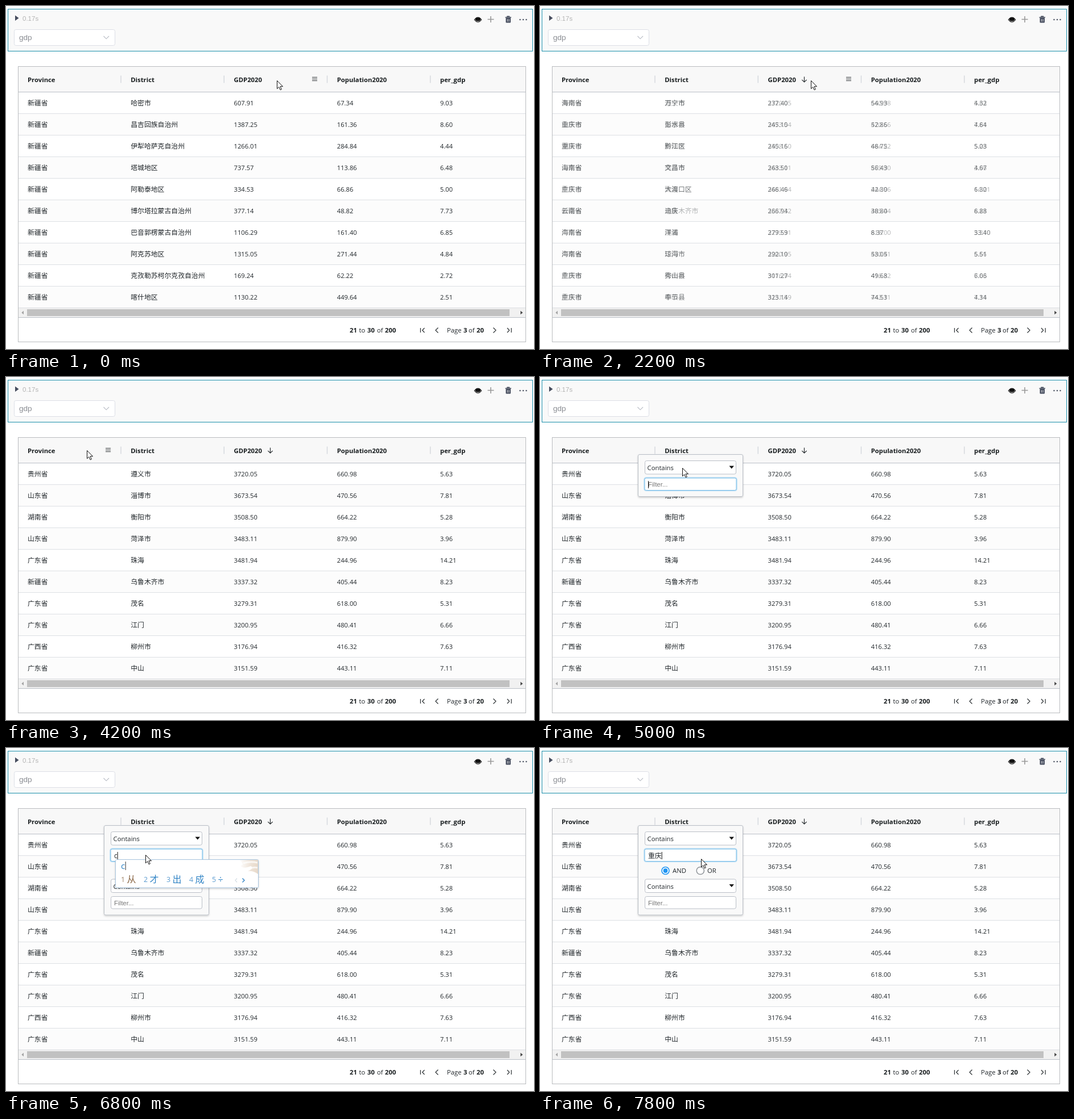
Recreate the animation shown at these times as an HTML page. Size 928 px wide and 604 px high, loop 8 s.

```html
<!DOCTYPE html>
<html lang="zh-CN">
<head>
<meta charset="utf-8">
<title>Table sort and filter</title>
<style>
html, body { margin: 0; width: 100%; height: 100%; overflow: hidden; background: #fff; }
svg { display: block; width: 928px; height: 604px; }
text { font: 11.3px 'Open Sans', 'Noto Sans CJK SC', 'Noto Sans CJK', sans-serif; fill: #20262a; white-space: pre; }
.cjk { font-size: 11.85px; }
.num { font-size: 11.2px; }
.b { font-weight: 700; fill: #181d1f; }
.arial { font-family: 'Liberation Sans', Arial, sans-serif; }
.hint { font: 11.5px 'Liberation Sans', Arial, sans-serif; fill: #777; }
.line { fill: none; stroke: #2b3033; stroke-width: 1.2; }
.box { fill: #fff; stroke: #babfc7; }
</style>
</head>
<body>
<svg id="stage" viewBox="0 0 928 604" xmlns="http://www.w3.org/2000/svg"></svg>
<script>
const LOOP = 8000, STEP = 200, COL = 181.25, LEFT = 22, ROW = 38, TOP = 152;

const tables = [
  `新疆省 哈密市 607.91 67.34 9.03
新疆省 昌吉回族自治州 1387.25 161.36 8.60
新疆省 伊犁哈萨克自治州 1266.01 284.84 4.44
新疆省 塔城地区 737.57 113.86 6.48
新疆省 阿勒泰地区 334.53 66.86 5.00
新疆省 博尔塔拉蒙古自治州 377.14 48.82 7.73
新疆省 巴音郭楞蒙古自治州 1106.29 161.40 6.85
新疆省 阿克苏地区 1315.05 271.44 4.84
新疆省 克孜勒苏柯尔克孜自治州 169.24 62.22 2.72
新疆省 喀什地区 1130.22 449.64 2.51`,
  `海南省 万宁市 237.40 54.93 4.32
重庆市 彭水县 245.10 52.86 4.64
重庆市 黔江区 245.16 48.75 5.03
海南省 文昌市 263.50 56.43 4.67
重庆市 大渡口区 266.46 42.30 6.30
云南省 迪庆 266.94 38.80 6.88
海南省 洋浦 279.59 8.37 33.40
海南省 琼海市 292.10 53.05 5.51
重庆市 秀山县 301.27 49.68 6.06
重庆市 奉节县 323.14 74.53 4.34`,
  `贵州省 遵义市 3720.05 660.98 5.63
山东省 淄博市 3673.54 470.56 7.81
湖南省 衡阳市 3508.50 664.22 5.28
山东省 菏泽市 3483.11 879.90 3.96
广东省 珠海 3481.94 244.96 14.21
新疆省 乌鲁木齐市 3337.32 405.44 8.23
广东省 茂名 3279.31 618.00 5.31
广东省 江门 3200.95 480.41 6.66
广西省 柳州市 3176.94 416.32 7.63
广东省 中山 3151.59 443.11 7.11`
];

const text = (x, y, s, cls = '', extra = '') => `<text x="${x}" y="${y}" class="${cls}" ${extra}>${s}</text>`;
const rect = (x, y, w, h, extra) => `<rect x="${x}" y="${y}" width="${w}" height="${h}" ${extra}/>`;
const path = (d, extra = 'class="line"') => `<path d="${d}" ${extra}/>`;
const colX = i => LEFT + 16 + COL * i;

function toolbar() {
  return rect(3.5, 5.5, 922, 74, 'fill="#f9f9f9" stroke="#1a8fab"') +
    path('M16 16.5L22.5 21.3L16 26Z', 'fill="#464d5e"') +
    text(29, 25.5, '0.17s', 'arial', 'style="font-size:11.5px;fill:#b4b4b4"') +
    rect(14.5, 41.5, 177, 28, 'rx="3" fill="#fff" stroke="#dcdfe6"') +
    text(23, 60, 'gdp', 'arial', 'style="font-size:13.6px;fill:#8a8d93"') +
    path('M171.5 53L176.2 57.8L181 53', 'fill="none" stroke="#b9bdc5" stroke-width="1.1"') +
    path('M823.3 24.2Q829.5 15.8 835.7 24.2Q829.5 32.3 823.3 24.2Z', 'fill="#fff" stroke="#111" stroke-width="1.1"') +
    '<ellipse cx="829.5" cy="23.4" rx="4.6" ry="3.3" fill="#111"/>' +
    path('M846.5 23.5H857.5M852 18V29', 'fill="none" stroke="#999" stroke-width="1.6"') +
    path('M877.5 20H888M881 19.5V18.3H884.5V19.5', 'fill="none" stroke="#464d5e" stroke-width="1.5"') +
    path('M878.5 21H887V28.5Q887 29.5 886 29.5H879.5Q878.5 29.5 878.5 28.5Z', 'fill="#464d5e"') +
    path('M881.4 23V27.5M884.1 23V27.5', 'stroke="#f9f9f9" stroke-width=".9"') +
    [903.5, 909, 914.5].map(x => `<circle cx="${x}" cy="24" r="1.2" fill="#464d5e"/>`).join('');
}

function grid() {
  let s = rect(22, 107, 891, 44, 'fill="#f8f8f8"');
  for (let i = 0; i < 10; i++) {
    const y = TOP + ROW * i;
    if (i % 2) s += rect(22, y, 891, ROW, 'fill="#fcfcfc"');
    s += rect(22, y + ROW - 1, 891, 1, 'fill="#dde0e4"');
  }
  s += rect(22, TOP - 1, 891, 1, 'fill="#babfc7"');
  ['Province', 'District', 'GDP2020', 'Population2020', 'per_gdp'].forEach((name, i) => {
    s += text(colX(i), 134, name, 'b');
    if (i < 4) s += rect(LEFT + COL * (i + 1) - 2, 122.5, 1.5, 13, 'fill="#d6d9de"');
  });
  s += rect(22, 532, 891, 16, 'fill="#f1f1f1"') + rect(37, 534, 848, 12, 'fill="#c1c1c1"') +
    path('M31 536.8V543.2L27.3 540Z', 'fill="#a3a3a3"') +
    path('M904.3 536.8V543.2L908.3 540Z', 'fill="#444"') +
    rect(22, 548, 891, 1, 'fill="#babfc7"') +
    rect(21.5, 106.5, 892, 485, 'fill="none" stroke="#babcbf"');
  const words = [[604, '21', 1], [620.5, 'to'], [635, '30', 1], [652, 'of'], [666, '200', 1],
    [775, 'Page'], [804, '3', 1], [813, 'of'], [827, '20', 1]];
  words.forEach(([x, w, bold]) => s += text(x, 575, w, bold ? 'b' : ''));
  return s + path('M728.5 567V575M735.5 567L731.8 571L735.5 575M759.5 566.5L755 571L759.5 575.5' +
    'M856.5 566.5L861 571L856.5 575.5M881 567L884.7 571L881 575M888.2 567V575');
}

function rows(data, id) {
  const cells = data.split('\n').map((line, r) => line.split(' ').map((v, c) =>
    text(colX(c), TOP + 23 + ROW * r, v, c < 2 ? 'cjk' : 'num')).join('')).join('');
  return `<g id="${id}">${cells}</g>`;
}

function select(y) {
  return rect(184.5, y, 160, 23.5, 'rx="3" class="box"') + text(188.5, y + 16.5, 'Contains') +
    path(`M332.5 ${y + 9}H341L336.75 ${y + 14}Z`, 'fill="#111"');
}

function popup() {
  return `<g id="popup">` + rect(172.5, 136.5, 184, 74, 'id="panel" rx="2.5" fill="#f9f9f9" stroke="#babfc7" filter="url(#shade)"') +
    select(147.5) +
    rect(183.5, 177.5, 162, 22.5, 'rx="3" fill="#fff" stroke="#bfe0f5" stroke-width="2.6"') +
    rect(184, 178, 161, 21.5, 'rx="2.5" fill="#fff" stroke="#74bbe6"') +
    text(190, 193, 'Filter...', 'hint', 'id="hint"') + text(190, 194, '', 'cjk', 'id="typed"') +
    rect(190, 183, 1, 13, 'id="caret" fill="#111"') +
    '<g id="more"><circle cx="220.5" cy="216" r="6.5" fill="#fff" stroke="#2196f3" stroke-width="1.6"/>' +
    '<circle cx="220.5" cy="216" r="3.9" fill="#2196f3"/>' +
    '<circle cx="281.8" cy="216" r="6.6" fill="#fff" stroke="#8f9499" stroke-width="1.5"/>' +
    text(233, 220.3, 'AND') + text(294, 220.3, 'OR') + select(231) +
    rect(184.5, 261.5, 160, 21.5, 'rx="3" class="box"') + text(190, 276.5, 'Filter...', 'hint') + '</g></g>';
}

// Input method window; its width follows the candidates
function imeWindow(typed, list) {
  let x = 202, items = '';
  list.split(' ').forEach((word, i) => {
    const tint = i ? '#2f83c5' : '#8a6644';
    items += text(x, 236, i + 1, '', `style="font-size:12.5px;fill:${i ? '#5b9bd0' : '#a08468'}"`) +
      text(x + 10.5, 237, word, '', `style="font-size:16px;fill:${tint}"`);
    x += 24 + 16 * word.length;
  });
  const r = x + 41;
  return rect(192.5, 196.5, r - 192, 49.5, 'rx="2" fill="#fff" stroke="#a9c6e0" filter="url(#shade)"') +
    `<g transform="translate(${r} 0)" opacity=".8">` +
    path('M-33 197H0V222Q-8 216 -18 217Q-6 211 -13 208Q-27 214 -31 207Q-22 206 -33 197Z', 'fill="url(#silk)"') +
    path('M-26 203Q-14 199 -1 202M-16 213Q-8 209 -1 211', 'fill="none" stroke="#fff" stroke-width="3" opacity=".7"') + '</g>' +
    text(202, 212.5, typed, '', 'id="pinyin" style="font-size:15px;fill:#2f83c5"') +
    rect(0, 200, 1, 15, 'id="imeCaret" fill="#333"') + items +
    path(`M${x + 4} 229.5L${x + 1} 233L${x + 4} 236.5`, 'fill="none" stroke="#d5dde4" stroke-width="1.2"') +
    path(`M${x + 13.5} 229.5L${x + 17} 233L${x + 13.5} 236.5`, 'fill="none" stroke="#2f83c5" stroke-width="1.4"');
}

document.getElementById('stage').innerHTML = `<defs>
<filter id="shade" x="-10%" y="-20%" width="120%" height="145%"><feDropShadow dx="0" dy="1.5" stdDeviation="1.8" flood-opacity=".2"/></filter>
<linearGradient id="silk"><stop offset="0" stop-color="#fff"/><stop offset=".6" stop-color="#eaddcf"/><stop offset="1" stop-color="#e2d0bd"/></linearGradient>
</defs>` + rect(0, 0, 928, 604, 'fill="#fff"') + toolbar() + grid() +
  tables.map((d, i) => rows(d, 'rows' + i)).join('') +
  path('M464.5 134V124.5M460.3 128.6L464.5 124.4L468.7 128.6', 'id="sort" class="line"') +
  path('M175 125.5H184M175 128.5H184M175 131.5H184', 'id="menu" fill="none" stroke="#2b3033"') +
  popup() + '<g id="ime"></g>' +
  path('M.5 .5V14.7L3.8 11.6L6.1 16.8L8.3 15.8L6 10.7H10.5Z', 'id="cursor" fill="#fff" stroke="#111" stroke-width="1" stroke-linejoin="round"');

const $ = id => document.getElementById(id);
const show = (id, on) => $(id).setAttribute('display', on ? 'inline' : 'none');

// Keys hold until the next one: [time, ...values]
const moves = [[0, 476, 131], [2800, 455, 132], [3000, 405, 133], [3200, 353, 132], [3400, 270, 133],
  [3600, 190, 131], [3800, 127, 132], [4200, 142, 129], [4400, 164, 120], [4600, 178, 126], [5000, 250, 160],
  [5200, 328, 199], [5400, 300, 195], [5600, 262, 187], [5800, 237, 183], [6000, 242, 186],
  [6200, 245, 188], [7200, 247, 189], [7600, 248, 190], [7800, 283, 195]];
const fades = [[0, 1, 0, 0], [600, .3, .7, 0], [800, 0, 1, 0], [2200, 0, .65, .35], [2400, 0, .25, .75], [2600, 0, 0, 1]];
const typing = [[0, '', ''], [6600, 'c', '从 才 出 成 ÷'], [7000, 'ch', '吃 出 成 长 车'],
  [7200, 'chongq', '重庆 重启 冲去 冲 虫'], [7400, 'chongqing', '重庆 重情 崇庆 冲 虫'], [7600, '重庆', '']];
const blinks = [[0, false], [4800, true], [5400, false], [5800, true], [6200, false], [6600, true]];

const at = (keys, t) => keys.filter(k => k[0] <= t).pop().slice(1);

let last = -1;
function draw(t) {
  if (t === last) return;
  last = t;

  at(fades, t).forEach((o, i) => {
    $('rows' + i).setAttribute('opacity', o);
    show('rows' + i, o > 0);
  });
  show('sort', t >= 600);
  $('sort').setAttribute('transform', t >= 2200 ? 'rotate(180 464.5 129.2)' : '');

  const [x, y] = at(moves, t);
  $('cursor').setAttribute('transform', `translate(${x} ${y})`);
  const open = t >= 4800;
  show('menu', !open && y > 107 && y < TOP);
  $('menu').setAttribute('transform', `translate(${Math.round(COL * Math.floor((x - LEFT) / COL))} 0)`);

  const more = t >= 6800;
  const [typed, list] = at(typing, t);
  show('popup', open);
  show('more', more);
  show('hint', !typed);
  $('panel').setAttribute('height', more ? 157.5 : 74);
  $('typed').textContent = typed;
  show('caret', at(blinks, t)[0]);
  const end = typed && $('typed').getComputedTextLength();
  $('caret').setAttribute('x', 190 + (end || 0));

  $('ime').innerHTML = list ? imeWindow(typed, list) : '';
  if (list) $('imeCaret').setAttribute('x', 202.5 + $('pinyin').getComputedTextLength());
}

const start = performance.now();
function tick() {
  const t = (performance.now() - start) % LOOP;
  draw(Math.floor(t / STEP) * STEP);
  requestAnimationFrame(tick);
}
draw(0);
requestAnimationFrame(tick);
</script>
</body>
</html>
```
